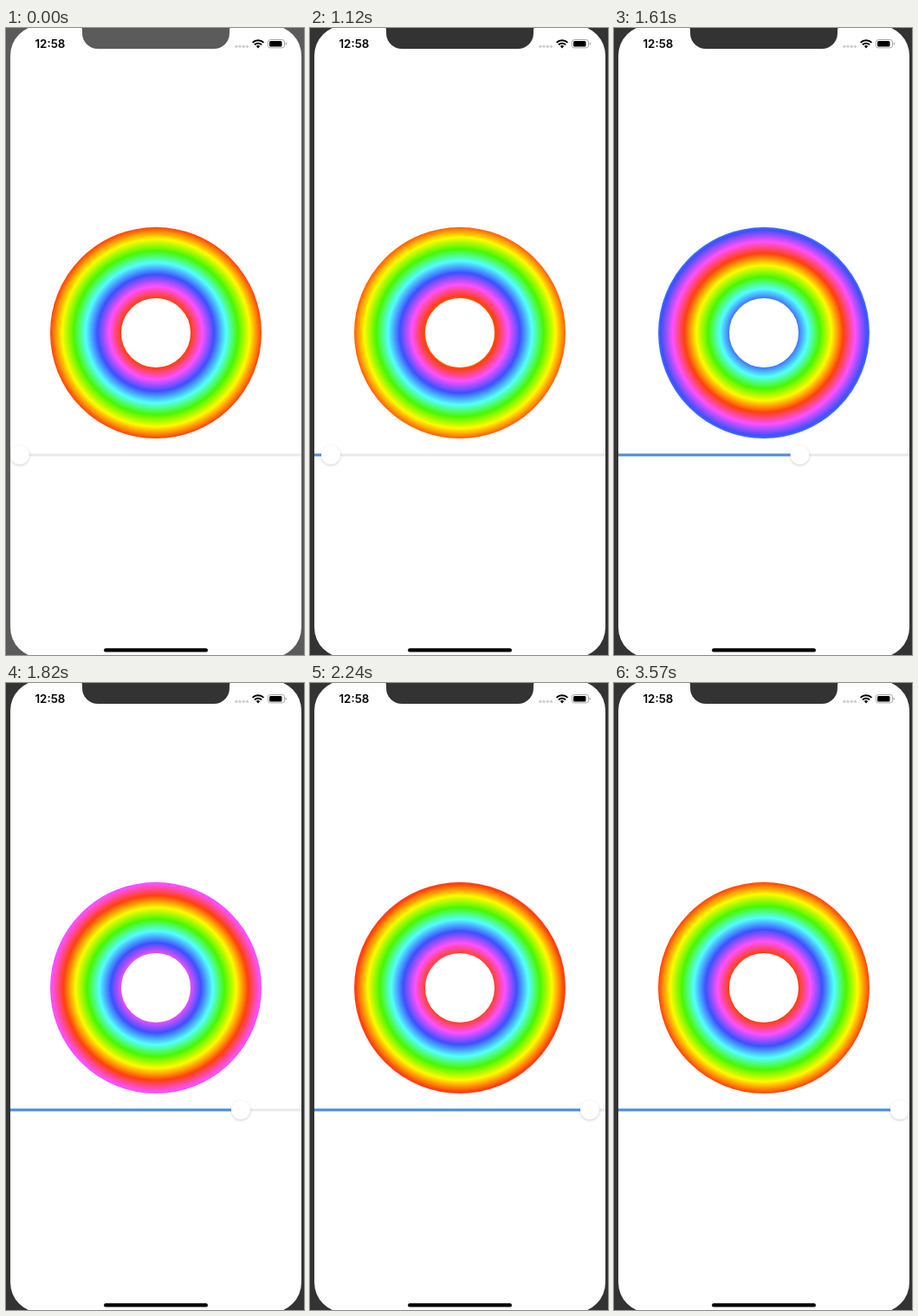
Recreate the animation shown at these times as an HTML page. Size 344 by 724 pixels, loop 3.64 s.

```html
<!DOCTYPE html>
<html lang="en">
<head>
<meta charset="utf-8">
<title>Hue ring</title>
<style>
  html, body { margin: 0; width: 100%; height: 100%; overflow: hidden; background: #333; }
  svg { display: block; width: 344px; height: 724px; }
  .time { font: 600 13.3px Inter, "Liberation Sans", sans-serif; }
  #thumb { filter: drop-shadow(0 1.5px 1.5px rgba(0, 0, 0, .2)); }
</style>
</head>
<body>
<svg viewBox="0 0 344 724">
  <defs>
    <radialGradient id="hues" gradientUnits="userSpaceOnUse" cx="173" cy="352" fx="173" fy="352" spreadMethod="repeat"></radialGradient>
    <clipPath id="screen"><rect x="5" y="-3" width="336" height="730" rx="35"/></clipPath>
  </defs>
  <rect class="case" width="344" height="724"/>
  <g clip-path="url(#screen)">
    <rect x="5" y="-3" width="336" height="730" fill="#fff"/>
    <circle cx="173" cy="352" r="81" fill="none" stroke="url(#hues)" stroke-width="82"/>
    <rect x="5" y="491.5" width="336" height="3" fill="#e9e9ea"/>
    <rect id="done" x="5" y="491.5" height="3" fill="#438fe6"/>
    <circle id="thumb" cy="493" r="11" fill="#fff"/>
  </g>
  <path class="case" d="M84 -3Q88 -2 88 3V6A18 18 0 0 0 106 24H240A18 18 0 0 0 258 6V3Q258 -2 262 -3Z"/>
  <text class="time" x="33.5" y="23">12:58</text>
  <g fill="#ccc">
    <circle cx="265.8" cy="21.3" r="1.6"/><circle cx="270" cy="21.3" r="1.6"/>
    <circle cx="274.2" cy="21.3" r="1.6"/><circle cx="278.4" cy="21.3" r="1.6"/>
  </g>
  <g fill="none" stroke="#000" stroke-width="2">
    <path d="M284.6 16.9A9 9 0 0 1 297.4 16.9"/>
    <path d="M286.9 19.4A5.7 5.7 0 0 1 295.1 19.4"/>
    <path d="M291 23.4L288.8 21.1A3.1 3.1 0 0 1 293.2 21.1Z" fill="#000" stroke="none"/>
  </g>
  <rect x="302.5" y="13.5" width="19" height="9.4" rx="2.8" fill="none" stroke="#a6a6a6"/>
  <rect x="304" y="15" width="14.5" height="6.4" rx="1.5"/>
  <path d="M322.7 16.6Q324 17 324 18.2T322.7 19.8Z" fill="#a6a6a6"/>
  <rect x="113" y="716.2" width="120" height="4.4" rx="2.2"/>
</svg>
<script>
const LOOP = 3640, STEP = 70, ACTIVE_AT = 840;
const MIN_X = 16, MAX_X = 330, INNER = 40, BAND = 82;
// Thumb position over time: [ms, x]
const DRAG = [[0, 16], [980, 16], [1120, 24], [1470, 166], [1820, 271], [2240, 323], [2590, 330], [3640, 330]];
const COLORS = ['#ff400c', '#ff50ff', '#3c50ff', '#54ffff', '#48f800', '#fffa00', '#ff400c'];

const $ = id => document.getElementById(id);
const hues = $('hues'), thumb = $('thumb'), done = $('done');
const cases = document.querySelectorAll('.case');

hues.innerHTML = COLORS.map((c, i) => `<stop offset="${i / 6}" stop-color="${c}"/>`).join('');

const slope = i => (DRAG[i + 1][1] - DRAG[i][1]) / (DRAG[i + 1][0] - DRAG[i][0]);

// Harmonic mean of neighbouring slopes keeps the curve monotone
function tangent(i) {
  if (i === 0 || i === DRAG.length - 1) return 0;
  const a = slope(i - 1), b = slope(i);
  return a * b > 0 ? 2 * a * b / (a + b) : 0;
}

function thumbX(t) {
  let i = 0;
  while (i < DRAG.length - 2 && t >= DRAG[i + 1][0]) i++;
  const [t0, x0] = DRAG[i], [t1, x1] = DRAG[i + 1];
  const h = t1 - t0, u = (t - t0) / h, w = 1 - u;
  return x0 * (1 + 2 * u) * w * w + x1 * u * u * (3 - 2 * u)
    + h * u * w * (tangent(i) * w - tangent(i + 1) * u);
}

function draw(ms) {
  const t = Math.floor(ms % LOOP / STEP) * STEP;
  const x = thumbX(t);
  const base = INNER + BAND * (x - MIN_X) / (MAX_X - MIN_X);
  hues.setAttribute('fr', base);
  hues.setAttribute('r', base + BAND);
  thumb.setAttribute('cx', x);
  done.setAttribute('width', x - 5);
  cases.forEach(el => el.setAttribute('fill', t < ACTIVE_AT ? '#5b5b5b' : '#333'));
}

let start;
function tick(now) {
  start ??= now;
  draw(now - start);
  requestAnimationFrame(tick);
}
draw(0);
requestAnimationFrame(tick);
</script>
</body>
</html>
```
